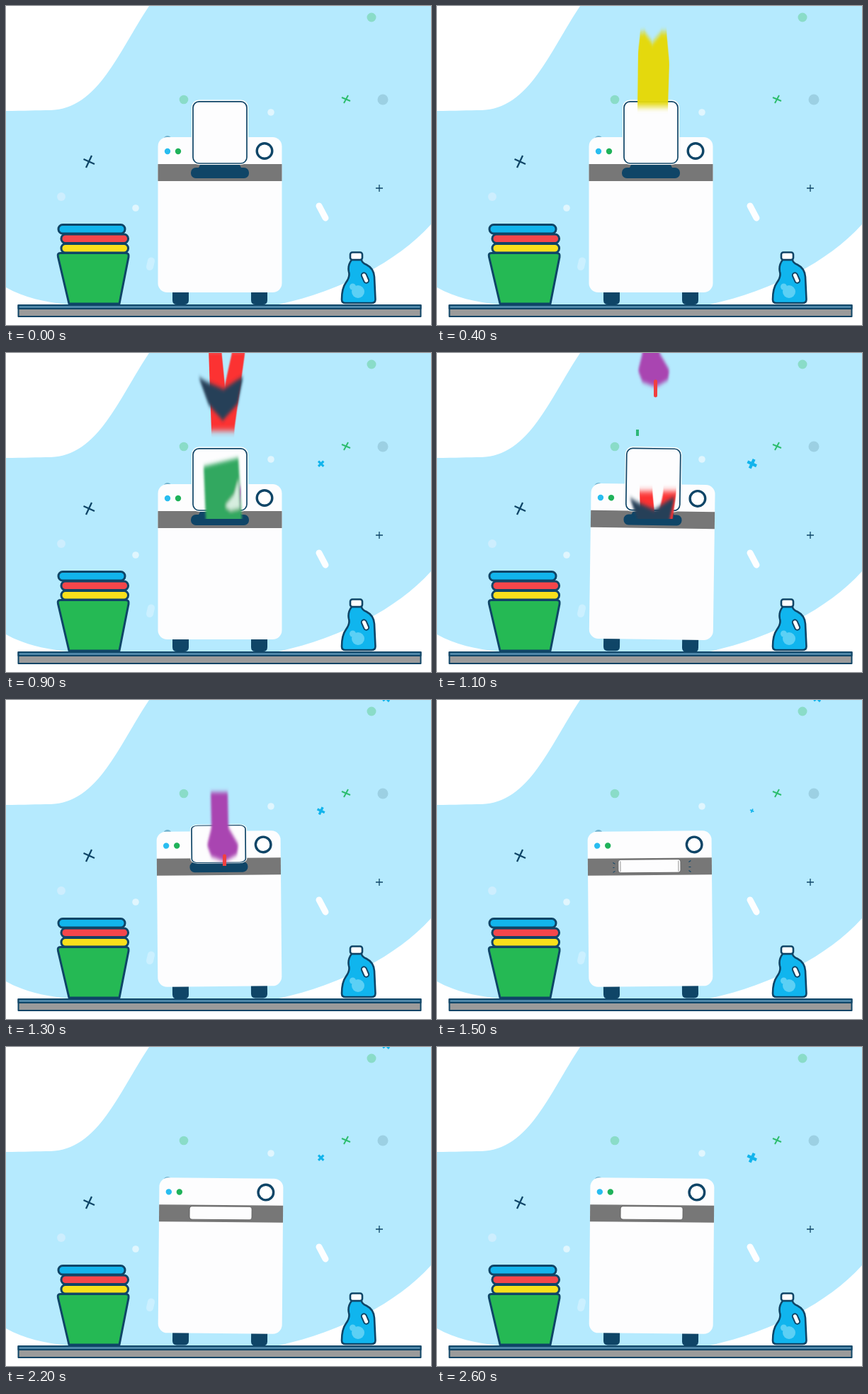
Write an HTML page that moves like this. It is 600 by 450 pixels and loops after 2.7 s.

```html
<!DOCTYPE html>
<html lang="en">
<head>
<meta charset="utf-8">
<title>Washing machine</title>
<style>
  html, body { margin: 0; width: 100%; height: 100%; overflow: hidden; background: #fff; }
  svg { display: block; width: 600px; height: 450px; }
  .ink { stroke: #0f4567; stroke-linejoin: round; stroke-linecap: round; }
</style>
</head>
<body>
<svg viewBox="0 0 600 450">
  <defs>
    <filter id="fall" x="-30%" y="-30%" width="160%" height="160%"><feGaussianBlur stdDeviation=".6 4"/></filter>
    <filter id="soft" x="-30%" y="-30%" width="160%" height="160%"><feGaussianBlur stdDeviation="1.6 3"/></filter>
    <clipPath id="opening"><path d="M0 0H600V234H0Z"/></clipPath>
  </defs>

  <!-- backdrop -->
  <path fill="#b5eafe" d="M202 0H600V308C550 363 470 402 385 421H88C55 418 25 411 0 397V148C24 148 45 147 63 147C130 145 158 66 202 0Z"/>
  <g fill="#8adcc8"><circle cx="516" cy="16" r="6.5"/><circle cx="251" cy="132" r="6.3"/></g>
  <circle cx="532" cy="132" r="7.5" fill="#9cd0e3"/>
  <circle cx="228" cy="189" r="6" fill="#6fb0cc"/>
  <g fill="#e0f6fe"><circle cx="374" cy="150" r="4.8"/><circle cx="183" cy="285" r="4.8"/></g>
  <circle cx="78" cy="269" r="6" fill="#cdeefe"/>
  <g fill="none" stroke-linecap="round">
    <path d="M442 282L451 299" stroke="#fdfeff" stroke-width="9"/>
    <path d="M205 359.500L203 368" stroke="#cbf0ff" stroke-width="10"/>
  </g>
  <path d="M109.500 216L125 223M121 211L113 228" stroke="#0f4567" stroke-width="2.300"/>
  <path d="M474 129L486 134M483 126L477 137" stroke="#2dbd6e" stroke-width="2"/>
  <path d="M522 257H532M527 252V262" stroke="#0f4567" stroke-width="1.300"/>
  <path id="spark" d="M-7 0H7M0 -7V7" stroke="#12b4ec" stroke-width="4.200"/>
  <path id="topSpark" d="M531 -8L541 2M541 -6L532 1" stroke="#12b4ec" stroke-width="3.200"/>

  <!-- machine -->
  <g id="machine">
    <path fill="#0f4567" d="M235 400H258V415Q258 421 252 421H241Q235 421 235 415ZM346 400H369V415Q369 421 363 421H352Q346 421 346 415Z"/>
    <rect x="214.500" y="185" width="175" height="219" rx="13" fill="#fdfdfe"/>
    <path fill="#777" d="M214.500 223H389.500V247H214.500Z"/>
    <circle cx="228" cy="205" r="4.200" fill="#29bdf0"/>
    <circle cx="243" cy="205" r="4.200" fill="#1fb25a"/>
    <circle cx="365" cy="204.500" r="10.800" fill="#fff" stroke="#0f4567" stroke-width="3.400"/>
    <g id="hinge" fill="#0f4567">
      <path d="M274 224H330L333 230H271Z"/>
      <rect x="261" y="228" width="82" height="15" rx="7"/>
    </g>
    <g id="lid">
      <rect x="262" y="132.500" width="80" height="91.500" rx="10.500" fill="#fff"/>
      <rect x="264" y="134.800" width="76" height="87.200" rx="8.500" fill="#fdfdfe" stroke="#0f4567" stroke-width="1.700"/>
    </g>
    <rect id="shut" x="257.500" y="225" width="88" height="18.500" rx="4" fill="#fdfdfe" stroke="#555" stroke-width=".8"/>
    <g id="rattle" fill="none" stroke="#0f4567">
      <path d="M260.500 227V242M342.500 227V242" stroke="#777" stroke-width=".8"/>
      <path d="M250 229L253 231M250 236H252M250 243L253 241M357 229L360 227M357 236H360M357 241L360 243"/>
    </g>
  </g>

  <!-- falling laundry -->
  <g clip-path="url(#opening)">
    <g data-at="600" data-speed=".85" fill="#e4d911">
      <path filter="url(#fall)" d="M287 208L293 207L304 222L317 207L324 207L328 250L326 312H283L284 234Z"/>
      <path d="M291 105H296V140H291Z"/>
    </g>
    <path data-at="600" data-speed=".85" fill="#ef55ee" filter="url(#fall)" d="M292 -65H332L327 54L333 64L340 56L340 70L329 103L315 98L306 86L292 101L276 96L269 58L278 55L286 66Z"/>
    <g data-at="900" data-speed=".85" filter="url(#soft)">
      <path fill="#31a861" d="M279 160L328 148L333 234L330 272H285L282 234Z"/>
      <path fill="#fff" opacity=".8" d="M328 178L322 200L309 216L317 222L330 219Z"/>
    </g>
    <path data-at="900" data-speed="1" fill="#fc3030" filter="url(#fall)" d="M286 -5H304L309 45L320 -5H338L322 110H290Z"/>
    <path data-at="900" data-speed=".85" fill="#263f59" filter="url(#soft)" d="M272 34L284 41L307 51L325 39L335 33L327 72L306 95L286 73Z"/>
    <g data-at="1100" data-speed=".9">
      <path fill="#a945b1" filter="url(#soft)" d="M289 -50H313L314 0L328 24L326 38L309 48L290 41L284 25L290 0Z"/>
      <path d="M308.500 40V60" stroke="#f04040" stroke-width="5" stroke-linecap="round"/>
      <path d="M281 108H285V117H281Z" fill="#2fb777"/>
    </g>
  </g>

  <!-- shelf, basket, bottle -->
  <g class="ink" stroke-width="2">
    <path fill="#9b9b9b" d="M17.500 422H585.500V438H17.500Z"/>
    <path fill="#4d86a8" d="M17.500 422H585.500V427H17.500Z"/>
  </g>
  <g class="ink" stroke-width="3">
    <rect x="74" y="308.500" width="94" height="12.500" rx="6" fill="#12b4ec"/>
    <rect x="78" y="322" width="94.500" height="12.500" rx="6" fill="#f4464b"/>
    <rect x="78" y="335.500" width="94.500" height="12.500" rx="6" fill="#f9e01b"/>
    <path fill="#25b954" d="M77 348.500H169Q174 348.500 173 354L160 420H89L73.500 354Q72 348.500 77 348.500Z"/>
  </g>
  <g class="ink" stroke-width="2.600">
    <path fill="#10b5ee" d="M488 358H502Q502 362 509 365Q519 370 520 382L521.500 414Q521.500 419 516 419H479Q474 419 474 414Q474 398 480 390Q486 382 484 375Q482 366 488 358Z"/>
    <rect x="486" y="347.500" width="17" height="10.500" rx="3" fill="#fff"/>
    <rect x="503.500" y="376" width="7" height="15" rx="3.500" fill="#fff" stroke-width="2" transform="rotate(-24 507 383.500)"/>
  </g>
  <g fill="#5cd0f5"><circle cx="497" cy="403" r="9"/><circle cx="489.500" cy="396" r="4.500"/></g>
</svg>
<script>
const LOOP = 2700, STEP = 100;
const $ = id => document.getElementById(id);
const move = (el, value) => el.setAttribute('transform', value);
const show = (el, on) => { el.style.display = on ? '' : 'none'; };
const laundry = [...document.querySelectorAll('[data-at]')];

// Linear interpolation through [time, value] points.
function track(points, t) {
  const i = points.findIndex(p => p[0] >= t);
  if (i < 0) return points[points.length - 1][1];
  if (i === 0) return points[0][1];
  const [t0, a] = points[i - 1], [t1, b] = points[i];
  return a + (b - a) * (t - t0) / (t1 - t0);
}

const sparkSize = [[500, 0], [600, .2], [900, .74], [1100, 1], [1200, 1], [1500, .42],
  [1700, 0], [1900, 0], [2200, .74], [2400, 1]];
const sparkTurn = [[900, 45], [1100, 25], [1500, 25], [1900, 45], [2200, 45], [2400, 25]];

function tilt(t) {
  if (t < 1100) return 0;
  if (t === 1100) return .8;
  return t / STEP % 2 ? -.5 : .5;
}

function draw() {
  const t = Math.floor(performance.now() % LOOP / STEP) * STEP;
  const closed = t >= 1400;

  move($('machine'), `rotate(${tilt(t)} 302 415)`);
  const fold = track([[1200, 1], [1400, .2]], t);
  move($('lid'), `translate(0 ${222 + (1 - fold) * 18}) scale(1 ${fold}) translate(0 -222)`);
  show($('lid'), !closed);
  show($('hinge'), !closed);
  show($('shut'), closed);
  show($('rattle'), t >= 1400 && t <= 1600);

  for (const item of laundry) {
    const { at, speed } = item.dataset;
    move(item, `translate(0 ${(t - at) * speed})`);
    show(item, t > 200 && !closed);
  }

  const size = track(sparkSize, t);
  show($('spark'), size > 0);
  move($('spark'), `translate(444.700 156.300) rotate(${track(sparkTurn, t)}) scale(${size})`);
  show($('topSpark'), t >= 1300 && t < 2500);
  requestAnimationFrame(draw);
}
draw();
</script>
</body>
</html>
```
